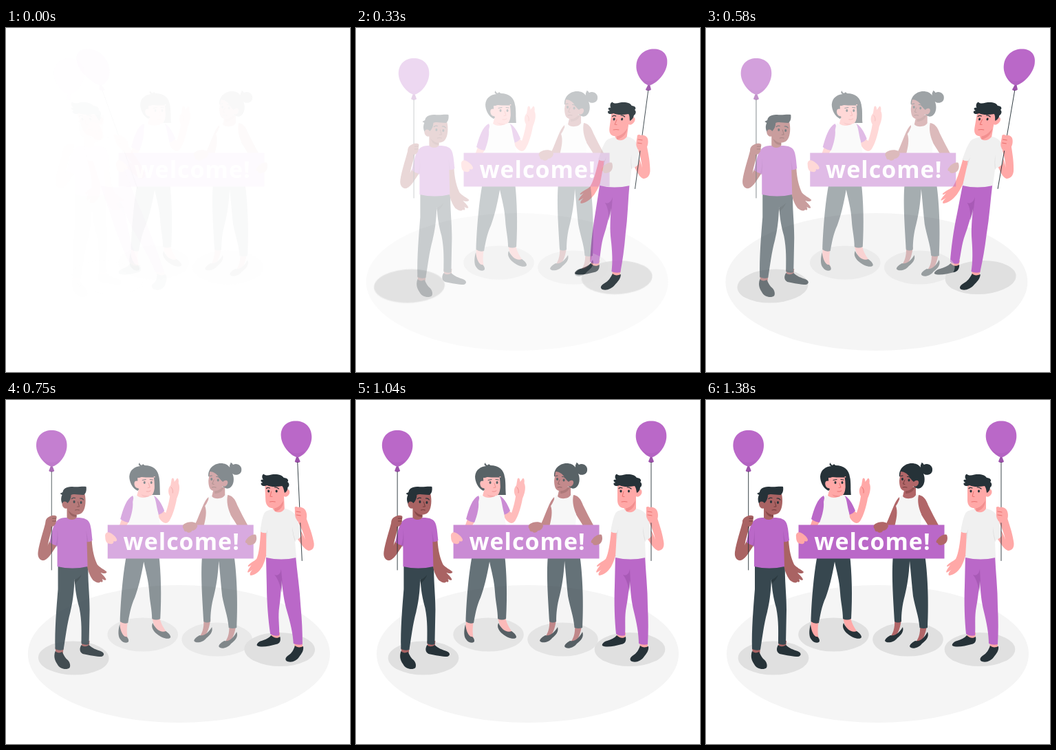
An HTML page for the animation above (1.43 s loop, 500 by 500 pixels).

```html
<!DOCTYPE html>
<html lang="en">
<head>
<meta charset="utf-8">
<title>Welcome</title>
<style>
html, body { margin: 0; width: 100%; height: 100%; overflow: hidden; background: #fff; }
svg { display: block; width: 100vw; height: 100vh; }
.purple { fill: #ba68c8; }
.plum { fill: #9c52aa; }
.ink { fill: #263238; }
.slate { fill: #37474f; }
.deep { fill: #2b393f; }
.white { fill: #f0f0f0; }
.pale { fill: #f5f5f5; }
.grey { fill: #e0e0e0; }
.pink { fill: #ffa8a7; }
.rose { fill: #f28f8f; }
.brown { fill: #a96363; }
.umber { fill: #874848; }
.tan { fill: #b16668; }
.line { fill: none; stroke: #263238; stroke-width: .9; stroke-linecap: round; }
.brow { stroke-width: 1.2; }
.soft { fill: none; stroke-width: 1; stroke-linecap: round; }
.r { stroke: #e9716f; }
.b { stroke: #713a3a; }
text { font: 600 34px "Noto Sans", "Open Sans", sans-serif; fill: #fff; text-anchor: middle; letter-spacing: 1px; }
</style>
</head>
<body>
<svg viewBox="0 0 500 500">
<defs>
  <g id="balloon">
    <path class="purple" d="M0 53C-11 50-22.3 35-22.3 22C-22.3 8-12.500 0 0 0C13 0 22.300 8 22.300 22C22.300 36 11 51 0 53Z"/>
    <path class="plum" opacity=".2" d="M-16 38C-8 50 3 48 12 43C8 49 4 52 0 53C-6 51-12 45-16 38Z"/>
    <path class="plum" d="M-1.500 52.500H1.500L4 59C2 61-2 61-4 59Z"/>
    <path class="line" d="M0 60V203"/>
  </g>
  <ellipse id="shade" class="grey" rx="51.300" ry="24.500"/>
  <ellipse id="eye" class="ink" rx="1.500" ry="1.900"/>
</defs>

<ellipse id="floor" cx="249.500" cy="369" rx="219.500" ry="100" fill="#f5f5f5"/>

<g id="shades">
  <use href="#shade" x="98" y="375"/>
  <use href="#shade" x="398" y="362.500"/>
</g>

<g id="left">
  <path class="brown" d="M67 359L79 361L78 370H68ZM105 350H117L116 360H106Z"/>
  <path class="ink" d="M67 365C65 371 65 377 70 384C73 391 84 393 88 389C90 384 87 379 83 376C80 373 79 369 77 366C74 368 70 368 67 365Z"/>
  <path class="ink" d="M105 356C102 361 102 366 107 369C117 371 127 373 134 373C139 372 139 367 133 365C127 363 121 361 116 356C112 359 108 359 105 356Z"/>
  <path class="slate" d="M71 238H115C114 262 117 280 117 305L116 355Q111 357 105 354C105 338 106 322 102 302C98 288 96 276 95 260C94 284 92 295 89 308C84 326 82 345 79 363Q73 365 67 362C66 335 69 300 71 275Z"/>
  <path class="deep" d="M95 262C97 260 101 259 105 254C102 262 98 263 96 268Z"/>
  <path class="brown" d="M54 174C50 190 44 207 42 221C41 229 45 234 51 233C59 230 64 218 71 209L62 199C59 206 57 208 56 212C58 200 62 190 64 180Z"/>
  <path class="brown" d="M111 205L120 203C121 220 124 230 128 239C132 244 138 246 142 250C141 253 136 252 133 251C136 254 140 258 141 261C140 263 137 261 135 260C137 263 136 266 133 264C130 267 126 265 122 262C116 254 114 246 112 235Z"/>
  <path class="purple" d="M84 171H98C109 171 116 173 118 182C120 190 120 197 121 204Q117 207 113 206L114 242Q92 247 70 242L70 212Q64 211 59 207C61 196 64 177 73 173C77 171 81 171 84 171Z"/>
  <path class="plum" opacity=".45" d="M70 188Q72 200 70 214L67 212Q71 202 70 188ZM112 190L113 206L115 206Z"/>
  <path class="brown" d="M84 150H98V171C95 175 87 175 84 171Z"/>
  <path class="umber" d="M86 159C89 164 93 167 98 167V170C92 170 87 167 86 159Z"/>
  <path class="ink" d="M81 156C76 151 74 144 77 138L74 136L78 134L92 138L86 152Z"/>
  <path class="brown" d="M83 140C84 132 107 132 110 137C112 146 111 156 108 161C105 167 97 168 92 165C87 163 84 158 83 155Z"/>
  <path class="ink" d="M78 136C77 129 84 125.500 92 126C100 127 106 125 112 126C113 132 111 137 108 138C101 138 94 136 90 138C90 143 88 147 85 150C81 150 78 144 78 136Z"/>
  <path class="brown" d="M85 150C82 146 77 147 77 152C78 157 82 159 85 157Z"/>
  <use href="#eye" x="94.500" y="148"/><use href="#eye" x="104.500" y="149"/>
  <path class="line brow" d="M91 143.500Q93 141.500 96 142.500M103 143Q106 142.500 108 145"/>
  <path class="soft b" d="M100 148L102 155L99 155M96 160Q99 159 102 160"/>
  <use href="#balloon" x="61.700" y="44"/>
  <path class="brown" d="M53 176C54 171 59 169 62 168C66 167 70 168 69 171C68 175 69 180 65 183C61 185 55 184 53 182Z"/>
  <path class="soft b" stroke-width=".7" d="M63 172L68 172M63 176L68 176"/>
</g>

<g id="right">
  <path class="pink" d="M378 336L392 338L391 348H381ZM412 350H424L424 362H413Z"/>
  <path class="ink" d="M379 342C376 346 371 348 365 350C360 351 357 355 358 357C363 360 376 358 386 355C392 354 393 349 392 344C388 347 383 346 379 342Z"/>
  <path class="ink" d="M413 357C411 363 408 368 403 371C398 374 397 378 401 380C408 382 414 379 418 374C422 369 426 364 425 358C421 360 416 360 413 357Z"/>
  <path class="purple" d="M377 225H420C421 250 424 275 424 300C425 320 425 338 424 355Q418 357 411 354C411 340 408 324 404 308C400 292 399 278 398 262C396 280 395 290 393 300C390 315 392 328 391 342Q384 344 378 340C376 320 375 295 376 270Z"/>
  <path class="plum" d="M398 246L399 264L397 280C396 270 393 260 388 254Q396 257 398 246Z" opacity=".6"/>
  <path class="pink" d="M371 190L382 190C381 218 376 233 371 242C366 250 359 255 353 255C351 252 355 248 357 246C354 248 350 252 349 250C350 246 353 243 355 240C352 242 350 243 350 241C354 236 360 234 363 231C367 223 369 209 371 190Z"/>
  <path class="pink" d="M436 166C440 178 445 192 447 205C449 214 445 219 439 219C432 216 428 208 422 199L429 190C432 194 434 200 435 203C433 193 430 185 426 178Z"/>
  <path class="white" d="M391 158H408C416 160 421 163 424 171C427 179 428 188 430 197Q426 203 420 204L421 229Q399 234 377 229L379 193Q374 194 370 191C372 182 373 173 377 165C380 160 386 160 391 158Z"/>
  <path fill="#dcdcdc" d="M382 182Q380 192 379 204L378.500 194Q381 190 382 182ZM417 184Q418 196 421 206L420 205Q417 196 417 184Z"/>
  <path class="pink" d="M390 140H407V158C403 165 393 165 390 158Z"/>
  <path class="rose" d="M392 157C398 156 403 152 406 146C406 155 400 161 393 162Z"/>
  <path class="pink" d="M380 125C381 118 404 116 408 124C408 128 408 130 408 131C412 128 416 130 415.500 134C415 139 410 142 407 140C405 149 400 157 391 157.500C382 157 380 151 380 145Z"/>
  <path class="ink" d="M408.500 135C407 133 408 129 405 125C398 126 390 127 383 124C379 126 374 125 374.500 121C375 120 376 121 377 120C373 118 374 115 378 116C376 113 376 109 379 107.500C381 110 385 110 390 108.500C398 107 406 109 408 113C413 113 416 117 413 119C416 121 416 125 413 127C413 131 411 133 408.500 135Z"/>
  <use href="#eye" x="385" y="132.500"/><use href="#eye" x="396.500" y="132.500"/>
  <path class="line brow" d="M382 128.500Q384 126.500 387 128M394 127Q397 126.500 400 129"/>
  <path class="soft r" d="M389 133L387 140L390 140.500M386 148Q390 147 394 148"/>
  <use href="#balloon" x="429" y="30.500"/>
  <path class="pink" d="M422 158C421 155 424 154 427 156C432 155 437 158 438 162C440 168 439 175 434 178C429 180 425 177 424 174C421 170 422 163 422 158Z"/>
  <path class="soft r" stroke-width=".7" d="M424 162L430 163M424 167L430 168"/>
</g>

<g id="pair">
  <use href="#shade" x="185.500" y="341"/>
  <use href="#shade" x="293.500" y="348"/>

  <path class="pink" d="M153 320H164C162 331 162 340 164 347L158 349C152 343 152 333 153 320ZM199 316H210C212 326 217 333 222 340L213 341C204 334 201 326 199 316Z"/>
  <path class="ink" d="M152 326C149.500 335 149.500 344 153 348C157 354 165 354 165 350C165 347 163 345 162 344C157 345 153 336 152 326Z"/>
  <path class="ink" d="M200 324C197 330 201 336 206 340C213 346 223 349 226 345C226 341 222 338 219 336C212 339 204 333 200 324Z"/>
  <path class="slate" d="M162 225H209C212 250 213 285 211 318Q205 321 199 318C199 305 196 295 195 280C194 262 190 250 187 235C183 258 179 273 174 287C168 300 166 313 164 324Q158 326 152.500 322C153 300 156 255 162 225Z"/>

  <path class="tan" d="M274 318H284C283 329 280 339 273 347L264 349C272 341 275 332 274 318ZM311 327H321C320 339 315 350 309 356L300 357C309 350 312 339 311 327Z"/>
  <path class="ink" d="M286 330C288 337 283 342 278 346C273 353 262 354 260 350C261 346 265 344 268 342C275 344 282 337 286 330Z"/>
  <path class="ink" d="M322 337C325 345 319 350 314 354C309 361 298 363 296 358C297 354 301 352 304 350C311 352 318 345 322 337Z"/>
  <path class="slate" d="M272 225H318C322 250 324 290 322 331Q316 333 310.500 331C309 313 304 302 301 285C299 268 298 252 296 234C295 255 292 272 289 284C285 299 284 310 284 322Q279 325 274 322C273 300 269 255 272 225Z"/>

  <path class="pink" d="M155 173L166 176L159 187H150ZM204 164L215 161L219 164C222 155 224 147 225 140C222 135 222 128 226 124L227.500 115C229 112 231.500 114 231.500 119L234.500 115C236 112 238.500 115 237.500 121C240 126 239 134 235 143C233 155 229 168 224 176C220 181 215 179 211 174Z"/>
  <path class="soft r" stroke-width=".7" d="M227 127Q230 130 229 135"/>
  <path class="purple" d="M171 139C162 143 157 158 153 173Q159 178 167 178L177 155ZM199 138C207 140 213 151 217 161Q212 167 205 167L196 153Z"/>
  <path class="pale" d="M173 138C177 141 188 141 193 138L201 138C205 144 205 154 208 164L211 183H163C168 172 172 158 171 148Z"/>
  <path class="pink" d="M180 128H195V138C192 143 182 143 177 139Z"/>
  <path class="rose" d="M183 137C188 140 192 139 195 136V140C190 142 186 141 183 137Z"/>
  <path class="ink" d="M182 96C179 95 179 93 181 91C181 94 183 94 184 95C185 93 187 93 188 95C201 95 208 102 209 112C211 120 210 130 210.500 138H198L200 110L178 132C170 128 166 119 166 111C167 101 174 97 182 96Z"/>
  <path class="pink" d="M178 112L203 108C204 119 204 130 200 137C196 142 186 139 181 132C178 128 178 120 178 112Z"/>
  <path class="pink" d="M179 118C174 116 172 120 174 125C176 129 180 129 181 127Z"/>
  <path class="ink" d="M175 111C179 115 182 112 184 112C192 113 200 112 209 113L204 102L182 101ZM201.500 111H209L210.500 138H202C203 130 203 121 201.500 111Z"/>
  <use href="#eye" x="188" y="120"/><use href="#eye" x="198" y="120"/>
  <path class="line brow" d="M185 116.500L190 115.500M196 115.500L200 116"/>
  <path class="soft r" d="M194 121L196 127L193 127.500M191 133Q194 134 197 132"/>

  <path class="tan" d="M281 141C274 147 270 163 262 180L264 188H275L283 160ZM306 138C315 137 320 144 323 153C328 163 333 173 338 182V188H326C320 177 313 168 309 159Z"/>
  <path class="pale" d="M284 138C287 142 300 142 305 137L309 138C307 147 309 157 313 166L312 184H274C277 173 279 162 276 154C279 150 281 144 284 138Z"/>
  <path class="tan" d="M289 127H305V138C302 144 290 145 286 140Z"/>
  <path class="umber" opacity=".7" d="M290 131C296 131 301 128 304 123C304 131 298 136 290 136Z"/>
  <path class="ink" d="M312 98C311 93 314 93 313 91C316 91 316 94 317 94C323 91 330 96 329 102C329 108 321 111 316 107C319 114 318 123 313 127C308 131 302 127 300 122L281 111C280 101 288 92 299 92C305 92 309 94 312 98Z"/>
  <path class="tan" d="M283 104C288 104 293 107 296 112C298 116 300 117 302 119C306 115 310 117 309 121C308 125 304 127 302 125C299 130 294 133 288 132C282 131 281 123 281 117Z"/>
  <use href="#eye" x="285.500" y="115"/><use href="#eye" x="295" y="116.500"/>
  <path class="line brow" d="M283 110.500L286 110M292.500 111.500Q295 111 297 113"/>
  <path class="soft b" d="M289 116L286.500 122L289 122.500M286 127Q289 126 292 127"/>

  <path class="purple" d="M134.500 181.500H346.500V230.500H134.500Z"/>
  <text x="242" y="217.500">welcome!</text>

  <path class="pink" d="M131 199C130 194 134 191 138 193C142 195 147 199 148 203C148 206 145 206 143 205C144 208 141 210 138 209C134 209 131 206 131 199Z"/>
  <path class="tan" d="M263 179C258 176 250 177 246 180C243 182 243 186 245 187C245 190 247 192 249 191C251 194 256 193 257 190C261 190 264 187 265 183Z"/>
  <path class="tan" d="M350 196C352 201 351 208 345 210C341 212 337 211 337 208C334 208 334 205 336 203C339 199 345 194 350 196Z"/>
</g>
</svg>
<script>
const LOOP = 1430, STEP = 125 / 3, LAST = 33;
const $ = id => document.getElementById(id);
const clamp = v => Math.max(0, Math.min(1, v));
const mix = (a, b, p) => a + (b - a) * p;
const cubic = (a, b, s) => 3 * (1 - s) * (1 - s) * s * a + 3 * (1 - s) * s * s * b + s * s * s;

// cubic-bezier(.36, -.01, .5, 1.38): a soft start and a small overshoot
function ease(x) {
  if (x <= 0 || x >= 1) return clamp(x);
  let lo = 0, hi = 1;
  for (let i = 0; i < 24; i++) {
    const mid = (lo + hi) / 2;
    if (cubic(.36, .5, mid) < x) lo = mid; else hi = mid;
  }
  return cubic(-.01, 1.38, lo);
}

function slide(id, from, p) {
  $(id).setAttribute("transform", `translate(${from * (1 - p)} 0)`);
  $(id).setAttribute("opacity", clamp(p));
}

// Rush in from the left, lean over, swing back and settle
function rush(ms) {
  if (ms < 600) {
    const p = ease(ms / 600);
    return { x: mix(-250, 0, p), lean: mix(20, -10, p), alpha: clamp(Math.max(.018, p)) };
  }
  const lean = ms < 800 ? mix(-10, 2, ease((ms - 600) / 200)) : mix(2, 0, ease((ms - 800) / 200));
  return { x: 0, lean, alpha: 1 };
}

function place(id, cy, { x, lean, alpha }) {
  const k = Math.tan(lean * Math.PI / 180);
  $(id).setAttribute("transform", `matrix(1 0 ${k} 1 ${x - k * cy} 0)`);
  $(id).setAttribute("opacity", alpha);
}

function draw(t) {
  const n = Math.min(LAST, Math.floor((t + 4) / STEP));
  const ms = n * STEP, p = (n + 1) / (LAST + 1);
  const pose = rush(ms + 32);
  slide("floor", -30, ease((ms + 45) / 1000));
  slide("left", 30, ease(p));
  slide("pair", 30, p);
  place("shades", 369, pose);
  place("right", 205.5, pose);
}

const start = performance.now();
function tick() {
  draw((performance.now() - start) % LOOP);
  requestAnimationFrame(tick);
}
tick();
</script>
</body>
</html>
```
